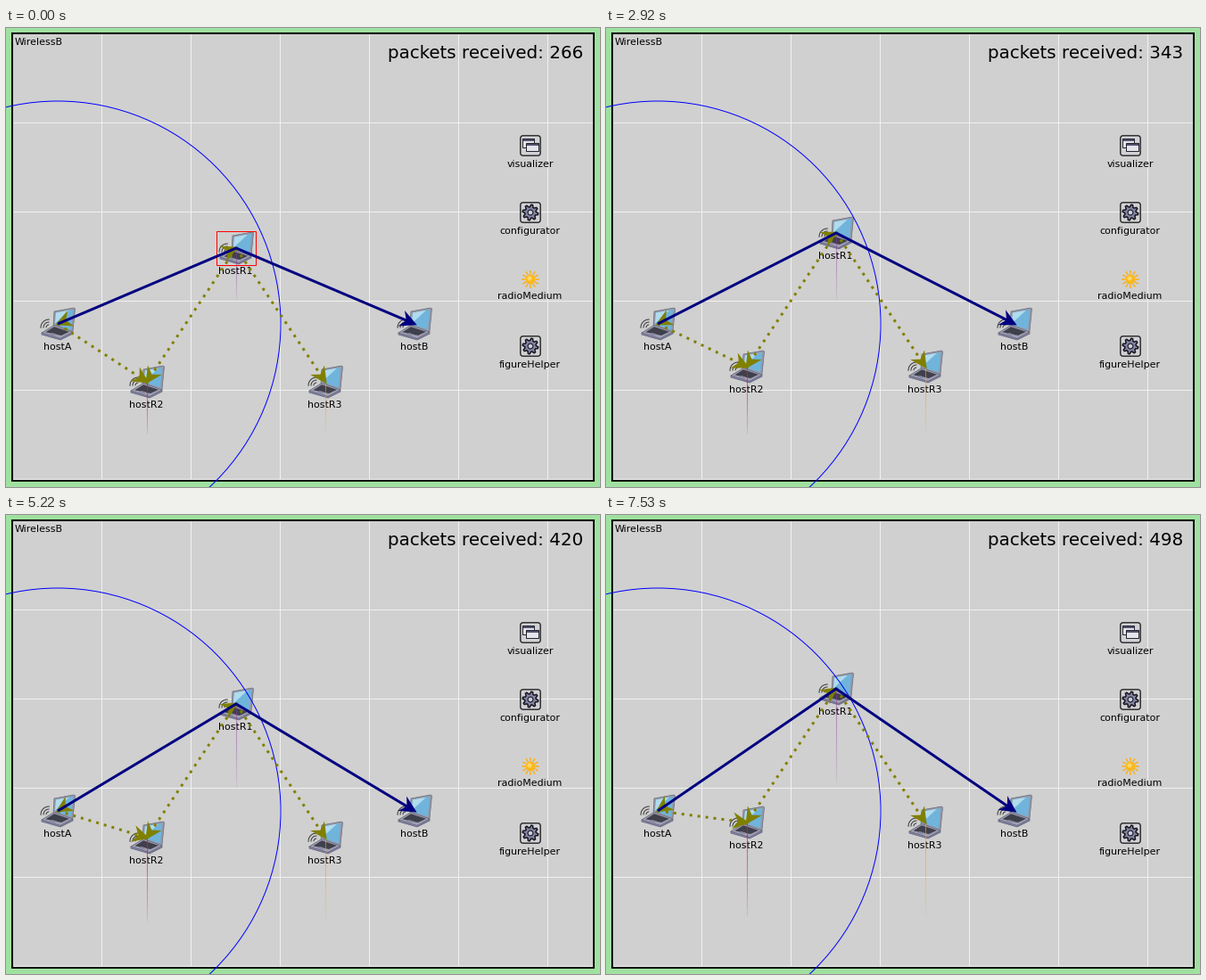
A matplotlib script for the animation above (8000 ms loop, 666 by 515 pixels).

```python
import numpy as np
import matplotlib.pyplot as plt
from matplotlib.animation import FuncAnimation
from matplotlib.collections import LineCollection, PolyCollection
from matplotlib.colors import to_rgb
from matplotlib.patches import Circle, FancyBboxPatch, Polygon, Rectangle

W, H, DPI = 666, 515, 72
LOOP, STEP = 8000, 20
STARTS = [0, 1460, 2300, 2920, 3550, 4380, 5220, 5850, 6690, 7530]
COUNTS = [266, 294, 319, 343, 368, 394, 420, 446, 472, 498]
NAVY, OLIVE = "#000080", "#808000"

plt.rcParams["font.family"] = "DejaVu Sans"
fig = plt.figure(figsize=(W / DPI, H / DPI), dpi=DPI, facecolor="#a0e0a0")
ax = fig.add_axes([0, 0, 1, 1])
ax.set(xlim=(0, W), ylim=(H, 0))
ax.axis("off")


def label(x, y, text, size=11, ha="center"):
    return ax.text(x, y, text, size=size, ha=ha, va="baseline", zorder=3)


def box(x0, y0, x1, y1, z=1, **style):
    return ax.add_patch(Rectangle((x0, y0), x1 - x0, y1 - y0, zorder=z, **style))


def disc(x, y, r, z=2, **style):
    ax.add_patch(Circle((x, y), r, zorder=z, **style))


# Playground
box(7, 6, 659, 508, z=0, fc="#d0d0d0", ec="none")
grid = [[(x, 7), (x, 508)] for x in range(107, 659, 100)]
grid += [[(8, y), (658, y)] for y in range(106, 508, 100)]
ax.add_collection(LineCollection(grid, colors="#f0f0f0", linewidths=1, zorder=0.5))
box(7, 6, 659, 508, fc="none", ec="black", lw=2)
label(10, 19, "WirelessB", ha="left")
counter = label(428, 34, "", size=19.9, ha="left")


# Module icons
def tile(x, y):
    ax.add_patch(FancyBboxPatch(
        (x - 9, y - 9), 18, 18, boxstyle="round,pad=2.2,rounding_size=3.2",
        fc="#d2d2d6", ec="#242424", lw=1.4, zorder=1))


def window(x0, y0, x1, y1, z):
    box(x0, y0, x1, y1, z, fc="#e4e4ec", ec="#26262e", lw=1)
    box(x0 + .5, y0 + .5, x1 - .5, y0 + 3, z + .05, fc="#50506e", ec="none")


def gear(x, y):
    a = np.arange(32) * np.pi / 16 + np.pi / 32
    r = np.where(np.arange(32) // 2 % 2, 6.3, 8.8)
    pts = np.column_stack([x + r * np.cos(a), y + r * np.sin(a)])
    ax.add_patch(Polygon(pts, fc="#8484a4", ec="#14141c", lw=1.5, zorder=2))
    disc(x, y, 2.9, fc="#ccccdc", ec="#20202c", lw=1.2)


def sun(x, y):
    a = np.arange(12) * np.pi / 6
    u = np.column_stack([np.cos(a), np.sin(a)])
    rays = np.stack([u * 6, u * 10], axis=1) + (x, y)
    ax.add_collection(LineCollection(rays, colors="#f8b020", linewidths=1.5, zorder=2))
    disc(x, y, 5.6, fc="#fbb81c", ec="none")
    disc(x - 1, y - 1, 2.6, fc="#ffd668", ec="none")


tile(588, 132)
window(579, 124, 592, 134, 2)
window(583, 129, 597, 138, 2.2)
for gy in (207, 357):
    tile(588, gy)
    gear(588, gy)
sun(588, 282)
for text, ty in (("visualizer", 156), ("configurator", 231),
                 ("radioMedium", 304), ("figureHelper", 381)):
    label(587.5, ty, text)

# Laptop icon, relative to the host position
LAPTOP = [
    ([(-4, -14), (18, -18), (19.5, -17), (17, 8), (15, 9.5), (-5, 2)], "#9498a8", "#686c7c"),
    ([(-2, -12.5), (17.2, -16), (15, 6.5), (-3.5, 0.5)], "#70b4dc", "none"),
    ([(-2, -12.5), (13, -15.3), (-3, -0.5)], "#b0dcee", "none"),
    ([(-18, 10), (3, 16), (17, 9), (17, 11), (3, 18), (-18, 12)], "#8888ac", "#5c5c78"),
    ([(-18, 10), (-4, 1.5), (17, 9), (3, 16.5)], "#a0a0b4", "#646478"),
    ([(-13.5, 9.3), (-4, 3.2), (13, 8.8), (4, 13)], "#40404c", "none"),
    ([(-9, 11.4), (-6, 10), (-1, 11.6), (-3.5, 13.2)], "#8888a0", "none"),
]
angles = np.radians(np.linspace(175, 275, 9))
WAVES = [np.column_stack([-10 + r * np.cos(angles), 4 + r * np.sin(angles)])
         for r in (3, 6, 9)]

NAMES = ["hostA", "hostB", "hostR1", "hostR2", "hostR3"]
laptops = ax.add_collection(PolyCollection(
    [p for p, *_ in LAPTOP] * 5, facecolors=[f for _, f, _ in LAPTOP] * 5,
    edgecolors=[e for *_, e in LAPTOP] * 5, linewidths=0.7, zorder=2.5))
waves = ax.add_collection(LineCollection([], colors="#383838", linewidths=1, zorder=2.6))
tags = [label(0, 0, name) for name in NAMES]

# Fading movement trails: x, start y, colour, peak alpha
TRAILS = [(258, 305, "#8a3c9c", .55), (158, 455, "#e81c1c", .75), (358, 455, "#f0a020", .65)]
PARTS = 12
fade = (1 - np.arange(PARTS) / PARTS) ** 0.7
trail_rgba = [(*to_rgb(c), peak * f) for _, _, c, peak in TRAILS for f in fade]
trails = ax.add_collection(LineCollection([], colors=trail_rgba, linewidths=1.1, zorder=3.5))

# Range circle, routes and selection frame
disc(58, 332, 250, z=4, fc="none", ec="#0000ff", lw=1)
links = ax.add_collection(LineCollection(
    [], colors=OLIVE, linewidths=3, linestyles=[(0, (1, 2))], zorder=5))
heads = ax.add_collection(PolyCollection([], facecolors=OLIVE, edgecolors="none", zorder=5.1))
route, = ax.plot([], [], color=NAVY, lw=3, solid_capstyle="butt",
                 solid_joinstyle="miter", zorder=6)
route_head = ax.add_collection(PolyCollection([], facecolors=NAVY, edgecolors="none", zorder=6.1))
select = box(236, 228, 280, 266, z=4.5, fc="none", ec="#ff0000", lw=1)


def head(p, q):
    """Barbed arrowhead at q for a line coming from p."""
    d = (q - p) / np.hypot(*(q - p))
    n = np.array([-d[1], d[0]])
    tip = q + 3 * d
    return [tip, tip - 19 * d + 9.5 * n, tip - 13 * d, tip - 19 * d - 9.5 * n]


def update(i):
    s = np.searchsorted(STARTS, i * STEP + 10, side="right") - 1
    y = round(247.2 - 5.8 * s)
    pos = np.array([(58, 332), (458, 332), (258, y), (158, y + 150), (358, y + 150)], float)
    a, b, r1, r2, r3 = pos

    counter.set_text(f"packets received: {COUNTS[s]}")
    select.set_visible(bool(s == 0))
    laptops.set_verts([np.add(p, h) for h in pos for p, *_ in LAPTOP])
    waves.set_segments([w + h for h in pos for w in WAVES])
    for tag, (hx, hy) in zip(tags, pos):
        tag.set_position((hx - .5, hy + 29))

    parts = []
    for (x, y0, *_), top in zip(TRAILS, pos[2:, 1]):
        ys = np.linspace(top, min(y0, top + 104), PARTS + 1)
        parts += [[(x, u), (x, v)] for u, v in zip(ys, ys[1:])]
    trails.set_segments(parts)

    links.set_segments([[a, r2], [r1, r2], [r1, r3]])
    heads.set_verts([head(p, q) for p, q in
                     ((r1, a), (a, r1), (a, r2), (r1, r2), (r1, r3))])
    end = b - 8 * (b - r1) / np.hypot(*(b - r1))
    route.set_data(*np.array([a, r1, end]).T)
    route_head.set_verts([head(r1, b)])
    return []


anim = FuncAnimation(fig, update, frames=LOOP // STEP, interval=STEP,
                     repeat=True, repeat_delay=0, blit=False)
plt.show()
```
